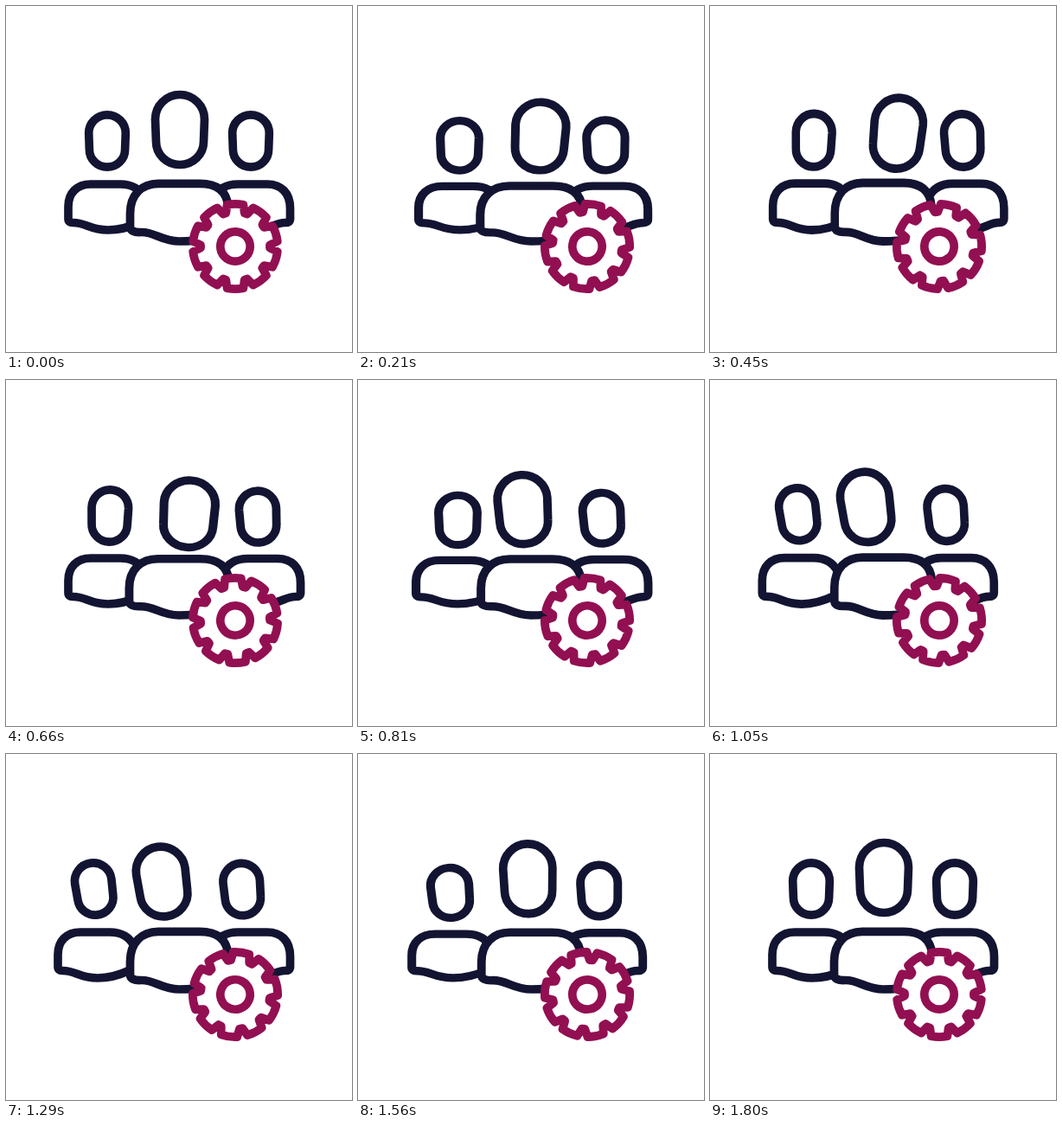
Animation of 400 by 400 pixels, one loop 1830 ms. Source, as an HTML page:

```html
<!DOCTYPE html>
<html lang="en">
<head>
<meta charset="utf-8">
<title>Team settings</title>
<style>
  html, body { margin: 0; width: 100%; height: 100%; overflow: hidden; background: #fff; }
  svg { display: block; width: 100%; height: 100%; }
  path, circle { fill: #fff; stroke: #131432; stroke-width: 9.7; stroke-linecap: round; stroke-linejoin: round; }
  #gear * { stroke: #920f52; }
</style>
</head>
<body>
<svg viewBox="0 0 400 400">
  <path id="leftBody" d="M165 232L160 222Q152 206 132 206H98C82 206 72 216 72 232V246Q72 250.5 77 250.5C92 250 96 259 118 259Q136 259 155 250"/>
  <path id="rightBody" d="M232 232L240 222Q248 206 268 206H302C318 206 328.5 216 328.5 234V246Q328.5 250.5 323 250.5C312 250 306 258 290 259"/>
  <path id="midBody" d="M224 205.4C244 205.4 255 214 257 232V262Q235 272 200 272C180 272 172 261 156 261.5Q143.5 262 143.5 255V240C143.5 218 157 205.4 176 205.4Z"/>
  <path id="leftHead" d="M-21.3-9A21.3 21.2 0 0 1 21.3-9L20.6 10A20.6 20.2 0 0 1-20.6 10Z"/>
  <path id="rightHead" d="M-21.3-9A21.3 21.2 0 0 1 21.3-9L20.6 10A20.6 20.2 0 0 1-20.6 10Z"/>
  <path id="midHead" d="M-28.5-12A28.5 28.5 0 0 1 28.5-12L27.5 14A27.5 26.5 0 0 1-27.5 14Z"/>
  <g id="gear"><path id="rim"/><circle r="17.2"/></g>
</svg>
<script>
const LOOP = 1830, STEP = 30;
const MOVES = [0, 570, 1300]; // look right, look left, return
const MOVE_TIME = 370, BOB_DELAY = 30, SETTLE = 500, SQUASH = .007;
const REST = [0, 0, 0];

// Poses are [dx, dy, angle]; lag delays the whole person; base is the point the body squashes onto
const people = [
  { name: "left", lag: 120, head: [117, 156], right: [3, 1, 2], left: [-15, 0, -8],
    bob: .75, base: [112, 257], bodyRight: 0, bodyLeft: -12 },
  { name: "right", lag: 50, head: [283, 156], right: [9, 1, -3], left: [-10, .5, -5],
    bob: .75, base: [285, 257], bodyRight: 12, bodyLeft: 0 },
  { name: "mid", lag: 0, head: [201, 143], right: [16, 6, 6], left: [-20.5, 4.5, -8],
    bob: 1, base: [200, 272], bodyRight: 0, bodyLeft: 0 }
];

const byId = id => document.getElementById(id);
const lerp = (a, b, u) => a + (b - a) * u;

function ease(u) {
  u = Math.min(1, Math.max(0, u));
  return u * u * (3 - 2 * u);
}

// One dip and a smaller rise, all over when the move has settled
function bobAt(phase, lag) {
  const u = (phase - lag - BOB_DELAY) / (SETTLE - lag - BOB_DELAY);
  return u > 0 && u < 1 ? 10 * Math.exp(-1.4 * u) * Math.sin(2 * Math.PI * u) : 0;
}

function place(id, x, y, angle, squash, [px, py] = [0, 0]) {
  byId(id).setAttribute("transform",
    `translate(${x + px} ${y + py}) rotate(${angle}) scale(${1 + squash} ${1 - squash}) translate(${-px} ${-py})`);
}

function drawPerson(p, t) {
  const move = MOVES.filter(start => start <= t).length - 1;
  const phase = t - MOVES[move];
  const done = ease((phase - p.lag) / MOVE_TIME);
  const between = poses => lerp(poses[move], poses[move + 1], done);

  const headPoses = [REST, p.right, p.left, REST];
  const [dx, dy, angle] = REST.map((_, i) => between(headPoses.map(pose => pose[i])));
  const bob = bobAt(phase, p.lag);
  place(p.name + "Head", p.head[0] + dx, p.head[1] + dy + bob * p.bob, angle, bob * SQUASH);

  // The middle body follows its head a little later
  const bodyBob = bobAt(phase, Math.max(p.lag, 40));
  place(p.name + "Body", between([0, p.bodyRight, p.bodyLeft, 0]), 0, 0, bodyBob * SQUASH, p.base);
}

function rimPath(teeth) {
  const at = (r, deg) => {
    const a = deg * Math.PI / 180;
    return (r * Math.sin(a)).toFixed(2) + " " + (-r * Math.cos(a)).toFixed(2);
  };
  let d = "";
  for (let i = 0; i < teeth; i++) {
    const mid = i * 360 / teeth;
    d += (i ? "L" : "M") + at(40, mid - 15.5) + "L" + at(49.2, mid - 11)
      + "A49.2 49.2 0 0 1 " + at(49.2, mid + 11) + "L" + at(40, mid + 15.5);
  }
  return d + "Z";
}

function draw() {
  const t = Math.floor(performance.now() % LOOP / STEP) * STEP;
  for (const p of people) drawPerson(p, t);
  place("gear", 265, 278, 360 * ease((t - 60) / 1680), 0);
  requestAnimationFrame(draw);
}

byId("rim").setAttribute("d", rimPath(10));
draw();
</script>
</body>
</html>
```
